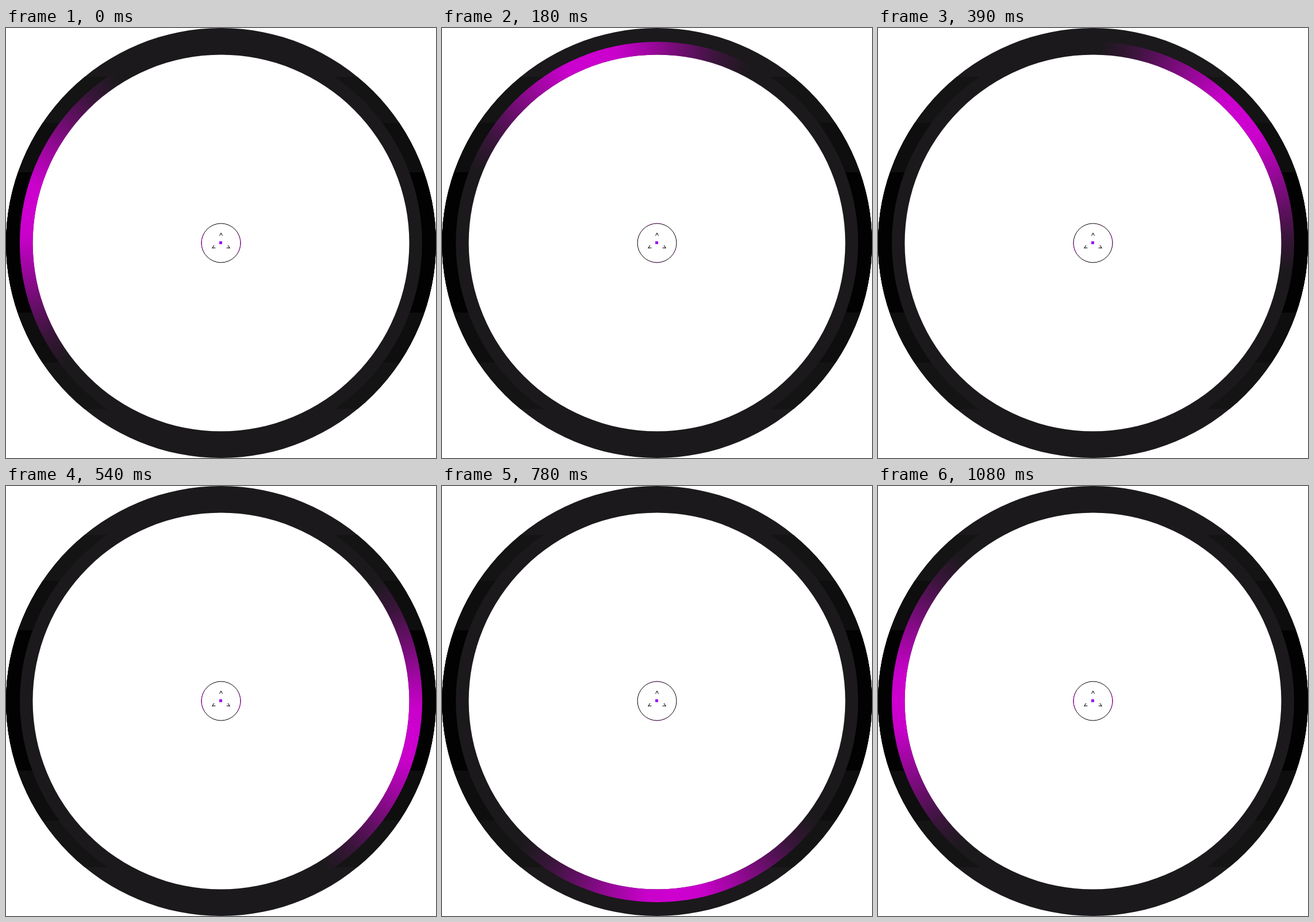
These frames come from a looping animation (748 by 748 pixels, 1.11 s). An HTML page with a canvas:

```html
<!DOCTYPE html>
<html lang="en">
<head>
<meta charset="utf-8">
<title>Ring loader</title>
<style>
  html, body { margin: 0; width: 100%; height: 100%; overflow: hidden; background: #fff; }
  canvas { display: block; width: 748px; height: 748px; }
</style>
</head>
<body>
<canvas id="stage" width="748" height="748"></canvas>
<script>
const ctx = document.getElementById('stage').getContext('2d');
const SIZE = 748, C = 374, STEP = 30, STEPS = 37;
const RAD = Math.PI / 180;
const BASE = '#1b191c';

// Glow strength by angular distance from its middle, in degrees
const PROFILE = [[0, 1], [8, 0.97], [18, 0.72], [30, 0.38], [38, 0.17], [48, 0]];

// Shaded bands of the outer rim: top, bottom, colour
const BANDS = [
  [85, 663, '#141415'],
  [165, 582, '#0e0e0e'],
  [251, 495, '#020202']
];

function ring(inner, outer) {
  ctx.beginPath();
  ctx.arc(C, C, outer, 0, 2 * Math.PI);
  ctx.arc(C, C, inner, 0, 2 * Math.PI, true);
}

function drawRim() {
  ctx.fillStyle = BASE;
  ring(327.5, 374);
  ctx.fill();
  ctx.save();
  ring(350, 374);
  ctx.clip();
  for (const [top, bottom, color] of BANDS) {
    ctx.fillStyle = color;
    ctx.fillRect(0, top, SIZE, bottom - top);
  }
  ctx.restore();
}

// Angles are clockwise from the left side
function drawGlow(angle) {
  const g = ctx.createConicGradient(angle * RAD, C, C);
  for (const [d, a] of PROFILE) {
    const color = `rgba(206,0,208,${a})`;
    g.addColorStop(0.5 - d / 360, color);
    if (d) g.addColorStop(0.5 + d / 360, color);
  }
  ctx.fillStyle = g;
  ring(327.5, 350);
  ctx.fill();
}

function drawDial(angle) {
  ctx.lineWidth = 1;
  ctx.strokeStyle = '#000';
  ctx.beginPath();
  ctx.arc(C, C, 34, 0, 2 * Math.PI);
  ctx.stroke();

  // Twin tint, strong at the sides and faint at top and bottom
  for (let p = 0; p < 360; p += 3) {
    let d = Math.abs(p - angle) % 180;
    d = Math.min(d, 180 - d);
    const near = Math.max(0, 1 - d / 60);
    const axis = Math.cos(2 * p * RAD);
    const a = Math.min(1, 1.4 * near) * (axis > 0 ? axis : -axis * 0.35);
    if (a < 0.12) continue;
    ctx.strokeStyle = `rgba(190,0,205,${a})`;
    ctx.beginPath();
    ctx.arc(C, C, 34, (p + 178.5) * RAD, (p + 181.5) * RAD);
    ctx.stroke();
  }

  ctx.strokeStyle = '#000';
  for (let i = 0; i < 3; i++) {
    ctx.save();
    ctx.translate(C, C);
    ctx.rotate(i * 120 * RAD);
    ctx.beginPath();
    ctx.moveTo(-2.5, -12.5);
    ctx.lineTo(0, -17.5);
    ctx.lineTo(2.5, -12.5);
    ctx.stroke();
    ctx.restore();
  }
  ctx.fillStyle = '#9a18f0';
  ctx.fillRect(371, 371, 5, 5);
}

// Ten degrees per step, slightly slower on the lower stretch
function glowAngle(n) {
  if (n <= 22) return 10 * (n + 1);
  if (n <= 30) return 230 + 8.75 * (n - 22);
  return 10 * n;
}

function draw(now) {
  const n = Math.floor(now / STEP) % STEPS;
  const angle = glowAngle(n);
  ctx.fillStyle = '#fff';
  ctx.fillRect(0, 0, SIZE, SIZE);
  drawRim();
  drawGlow(angle);
  drawDial(angle);
}

let start;
function tick(now) {
  if (start === undefined) start = now;
  draw(Math.max(0, now - start));
  requestAnimationFrame(tick);
}
draw(0);
requestAnimationFrame(tick);
</script>
</body>
</html>
```
